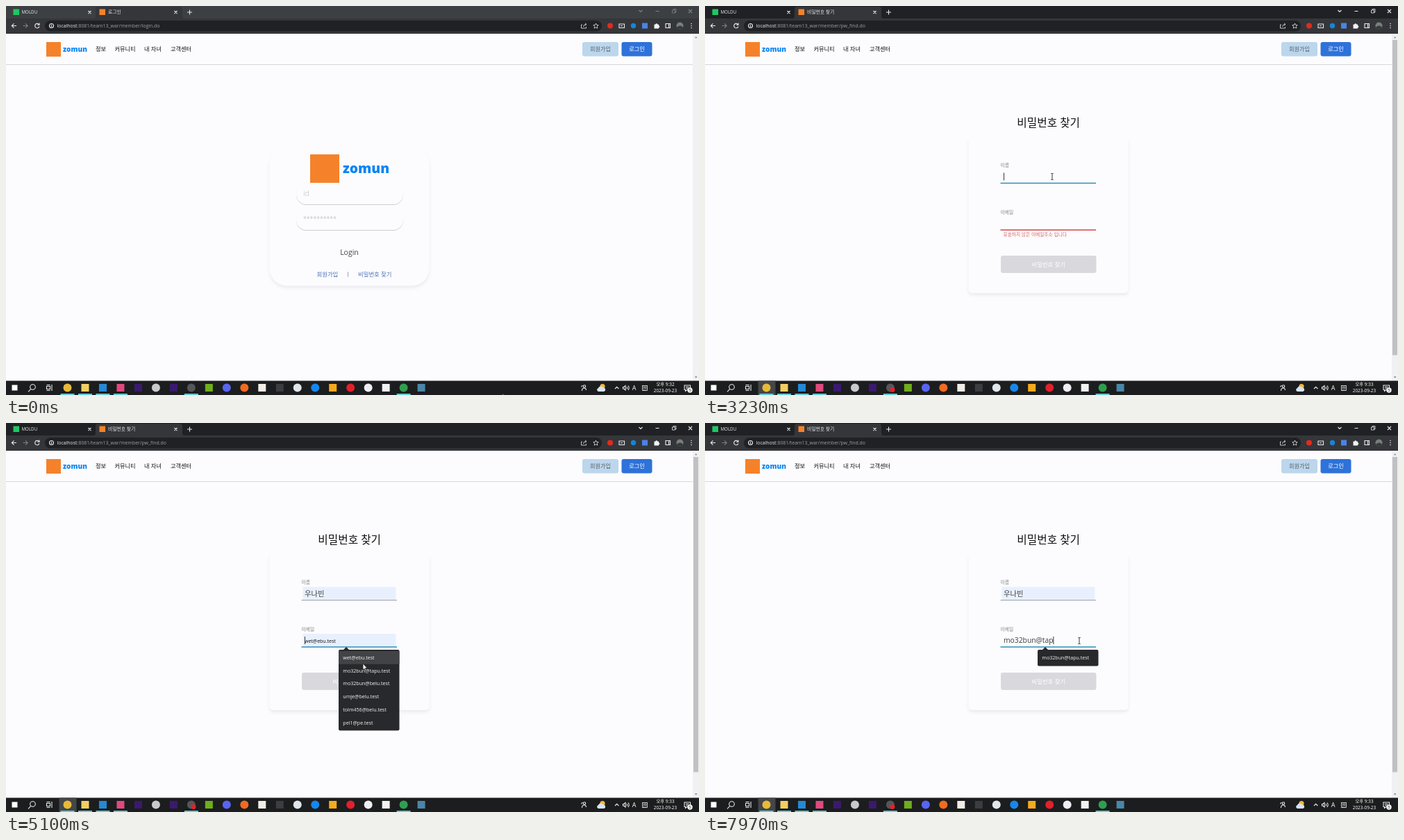
Animation, 998 px wide and 561 px high, one loop 8 s. Source, as an HTML page:

```html
<!DOCTYPE html>
<html lang="ko">
<head>
<meta charset="utf-8">
<title>비밀번호 찾기</title>
<style>
html, body { margin: 0; width: 100%; height: 100%; overflow: hidden; background: #fcfcfe; }
svg { display: block; font-family: "Open Sans", "Noto Sans CJK KR", "Noto Sans CJK", sans-serif; }
text { white-space: pre; }
.mid { text-anchor: middle; }
.tab { font-size: 6.8px; fill: #e8eaed; }
.url { font-size: 6.95px; fill: #9aa0a6; }
.nav { font-size: 8.2px; font-weight: 500; fill: #111; }
.link { font-size: 8.4px; fill: #4a70b4; }
.brand { font-weight: 800; fill: #0a84f5; }
.title { font-size: 15.7px; font-weight: 500; fill: #111; }
.label { font-size: 6.8px; fill: #858585; }
.error { font-size: 6.7px; fill: #d3666b; }
.typed { font-size: 10.3px; fill: #3c3c3c; }
.typed.preview { font-size: 7px; fill: #111; }
.row { font-size: 7.1px; fill: #f4f4f4; }
.clock { font-size: 6.4px; fill: #fff; }
.icon { fill: none; stroke: #e8eaed; stroke-width: 1.1; }
.dim { opacity: .4; }
.card { fill: #fcfcfe; filter: drop-shadow(0 3px 2px rgba(40, 40, 80, .08)); }
.pill { fill: #fcfcfe; filter: drop-shadow(0 1px .4px rgba(0, 0, 0, .18)); }
</style>
</head>
<body>
<svg id="stage" width="998" height="561" viewBox="0 0 998 561">
  <rect width="998" height="561" fill="#fcfcfe"/>

  <!-- browser frame -->
  <rect id="frame" width="998" height="40"/>
  <path d="M0 18H126Q129 18 129 14V5Q129 1 133 1H250Q254 1 254 5V14Q254 18 257 18H998V40H0Z" fill="#35363a"/>
  <rect x="10.500" y="4.500" width="8.500" height="8.500" fill="#1ec862"/>
  <text class="tab" x="22.500" y="11" style="font-size:6.2px">MOLDU</text>
  <path class="icon" d="M118.500 7l4 4m0-4l-4 4M242.500 7l4 4m0-4l-4 4M261 9h7M264.500 5.500v7"/>
  <rect x="134.500" y="4.500" width="8.500" height="8.500" fill="#f5822a" data-show="0 2050"/>
  <g data-show="2050 2600"><circle cx="138.700" cy="8.800" r="2.600" fill="#8b8e93"/><path d="M136.500 10.500l4-3.500" stroke="#35363a" stroke-width=".8"/></g>
  <rect x="134.500" y="4.500" width="8.500" height="8.500" fill="#f5822a" data-show="2600 8000"/>
  <text class="tab" x="147" y="11" data-show="0 2050">로그인</text>
  <text class="tab" x="147" y="11" data-show="2050 8000">비밀번호 찾기</text>
  <g id="controls" class="icon">
    <path d="M911.500 6l2.500 2.500 2.500-2.500M935.500 7.500h5M983 5l5 5m0-5l-5 5"/>
    <path d="M959.500 6h4v4h-4zM961 6V4.500h4V9h-1.500" stroke-width=".8"/>
  </g>
  <rect x="56" y="21" width="802" height="15.500" rx="7.700" fill="#202124"/>
  <path class="icon" d="M15 28.500H8.500m3-3.200l-3.200 3.200 3.200 3.200M47.300 26.500a3.200 3.200 0 1 0 .6 3M48 24.500v2.700h-2.700"/>
  <path class="icon dim" d="M24.500 28.500H31m-3-3.200l3.200 3.200-3.200 3.200"/>
  <circle class="icon" cx="65.500" cy="28.500" r="3" stroke-width=".8"/><path class="icon" d="M65.500 28v2.200m0-3.600v.8" stroke-width=".8"/>
  <text class="url" x="73.500" y="31"><tspan fill="#e8eaed">localhost</tspan>:8081/team13_war/member/<tspan id="page"></tspan></text>
  <g class="icon" stroke-width=".9">
    <path d="M830 27h-1.500v5h7v-2M831.500 30q0-3.500 4-3.500m-1.500-1.700l2 1.700-2 1.700" stroke-width=".8"/>
    <path d="M849.500 25l1.100 2.400 2.600.3-1.900 1.800.5 2.600-2.300-1.300-2.300 1.300.5-2.600-1.900-1.800 2.600-.3z" stroke-width=".8"/>
    <path d="M883 26h7.500v5.500H883zM885 28.800h3"/>
    <path d="M950 25.500h6.500v6H950zM954.500 25.500v6"/>
  </g>
  <circle cx="870" cy="28.500" r="4" fill="#e02b20"/>
  <circle cx="903.500" cy="28.500" r="3.700" fill="#1685d8"/>
  <rect x="916" y="24.500" width="8" height="8" fill="#4b83e6"/>
  <path d="M933.500 26.500h2a1.300 1.300 0 0 1 2.600 0h2v2a1.300 1.300 0 0 1 0 2.600v1.400h-6.600z" fill="#f1f3f4"/>
  <circle cx="970.500" cy="28.500" r="5" fill="#77807a"/><path d="M966 30.500a5 5 0 0 0 9 0q-4-4-9 0z" fill="#343b39"/>
  <path d="M987 25.500h.01M987 28.500h.01M987 31.500h.01" stroke="#e8eaed" stroke-width="1.600" stroke-linecap="round"/>

  <!-- site header -->
  <rect x="58" y="52" width="21" height="21" fill="#f5822a"/>
  <text class="brand" x="82" y="66" font-size="10">zomun</text>
  <text class="nav" x="129" y="65">정보</text>
  <text class="nav" x="156.500" y="65">커뮤니티</text>
  <text class="nav" x="199" y="65">내 자녀</text>
  <text class="nav" x="237" y="65">고객센터</text>
  <rect x="830" y="52" width="52" height="20.500" rx="3" fill="#bcd6ec"/>
  <text class="nav mid" x="856" y="65" style="fill:#55606a;font-weight:400">회원가입</text>
  <rect x="886.500" y="52" width="44" height="20.500" rx="3" fill="#2e72da"/>
  <text class="nav mid" x="908.500" y="65" style="fill:#fff">로그인</text>
  <path d="M0 84.500H989" stroke="#d8d8da"/>
  <rect x="989" y="40" width="9" height="501" fill="#f1f1f3"/>
  <path d="M991.800 46.300l1.900-2.400 1.900 2.400zM991.800 534.300l1.900 2.400 1.900-2.400z" fill="#8c8c8c"/>
  <rect x="990" y="49" width="7" height="454.500" fill="#c1c1c3" data-show="2050 8000"/>

  <!-- login page -->
  <g data-show="0 2050">
    <rect class="card" x="379.500" y="203.500" width="230" height="200" rx="25"/>
    <rect x="438" y="214" width="42" height="41" fill="#f5822a"/>
    <text class="brand" x="485" y="241" font-size="19.300">zomun</text>
    <rect class="pill" x="418" y="257" width="154" height="29" rx="14.500"/>
    <rect class="pill" x="418" y="294" width="154" height="29" rx="14.500"/>
    <text x="428" y="273.500" font-size="10.300" fill="#d0d0c8">id</text>
    <text x="428" y="310" font-size="8.700" fill="#c4c4c6">**********</text>
    <text class="mid" x="494.500" y="359" font-size="10.500" fill="#444">Login</text>
    <text class="link" x="447.500" y="389.500">회원가입</text>
    <path d="M492.500 383.500v7" stroke="#7f8fb0" stroke-width=".8"/>
    <text class="link" x="507" y="389.500">비밀번호 찾기</text>
  </g>

  <!-- password page -->
  <g data-show="2050 8000">
    <text class="title mid" x="494.700" y="174">비밀번호 찾기</text>
    <rect class="card" x="379.500" y="190" width="230" height="224" rx="5"/>
    <text class="label" x="425.500" y="232">이름</text>
    <text class="label" x="425.500" y="299.500">이메일</text>
    <rect id="nameFill" x="427.500" y="236.500" width="134" height="18.500" fill="#e8f0fe"/>
    <rect id="mailFill" x="427.500" y="304" width="134" height="18.500" fill="#e8f0fe"/>
    <path id="nameLine" d="M425.500 255.500H563"/>
    <path id="mailLine" d="M425.500 323H563"/>
    <text class="error" x="429.500" y="263.500" data-show="2050 3200">이름을 입력하세요</text>
    <text class="error" x="429.500" y="331.500" data-show="2050 4700">유효하지 않은 이메일주소 입니다</text>
    <text id="name" class="typed" x="430" y="249.500"></text>
    <text id="mail" class="typed" x="430" y="317"></text>
    <rect id="caret" width=".9" height="11" fill="#222"/>
    <rect x="426" y="360" width="137.500" height="25" rx="3" fill="#d9d9dd"/>
    <text class="mid" x="494.700" y="375.700" font-size="8.400" fill="#fff">비밀번호 찾기</text>
    <g id="popups"></g>
  </g>

  <g data-show="1500 2560">
    <path d="M0 529.500H140Q142 529.500 142 531.500V541H0Z" fill="#292a2d"/>
    <text x="2.500" y="537.300" font-size="6.150" fill="#f1f3f4">localhost:8081/team13_war/member/pw_find.do</text>
  </g>

  <!-- taskbar -->
  <rect y="540.500" width="998" height="20.500" fill="#1c1d1e"/>
  <rect x="76.500" y="540.500" width="25" height="20.500" fill="#444648" data-show="1500 8000"/>
  <g id="apps"></g>
  <rect x="8.500" y="546.500" width="8" height="8" fill="#fff"/>
  <circle class="icon" cx="38.500" cy="549.500" r="3.800"/><path class="icon" d="M35.800 552.300l-3.800 4" stroke-width="1.300"/>
  <path class="icon" d="M58.500 548.500h5v4h-5zM58.500 546.500h5M58.500 554.500h5M66 546v9" stroke-width=".8"/>
  <circle cx="270" cy="553.500" r="3.400" fill="#e8202a" data-show="150 8000"/>
  <g class="icon" stroke-width=".9">
    <circle cx="833" cy="548.500" r="1.700"/><path d="M829.500 555q0-4 3-4t3 3M829 549.500a1.500 1.500 0 0 1 1.500-2"/>
    <path d="M877 552l2.700-2.700 2.700 2.700M888.500 549.500h1.500l2-2v6.500l-2-2h-1.500zM894 549q1.300 1.700 0 3.500M896 547.500q2.300 3 0 6.500"/>
    <rect x="916.500" y="547.500" width="7" height="7" stroke-width=".8"/>
    <path d="M977 547h8.500v6.500h-5l-2 2v-2H977zM979 549.200h4.500M979 551.200h4.500"/>
  </g>
  <circle cx="859" cy="548.500" r="3.600" fill="#f5b83d"/>
  <path d="M853 556a2.600 2.600 0 0 1 0-5 3.800 3.800 0 0 1 7-.5 2.800 2.800 0 0 1 1 5.500z" fill="#d5e4f5"/>
  <text class="mid" x="904.500" y="554" font-size="9" fill="#fff" data-show="0 2050">A</text>
  <g class="icon" data-show="2050 3200"><circle cx="904.500" cy="550.700" r="3"/><path d="M903 549.200l3 3m0-3l-3 3" stroke-width=".9"/></g>
  <text class="mid" x="904.500" y="554" font-size="9" fill="#fff" data-show="3200 8000">A</text>
  <text class="mid" x="920" y="553.500" font-size="6.500" fill="#fff">한</text>
  <text class="clock mid" x="949.500" y="548" id="clock"></text>
  <text class="clock mid" x="949.500" y="557">2023-09-23</text>
  <circle cx="985" cy="554" r="3.700" fill="#f4f4f4"/><text class="mid" x="985" y="556.300" font-size="6" fill="#222">5</text>

  <g id="pointer">
    <path id="arrow" d="M0 0v9l2-1.800 1.400 3 1.400-.7-1.400-2.900H6.200z" fill="#fff" stroke="#222" stroke-width=".8"/>
    <path id="beam" d="M-1.700-4.500H-.5L0-4 .5-4.500H1.700M0-4V4M-1.700 4.500H-.5L0 4 .5 4.500H1.700" fill="none" stroke="#222" stroke-width=".9"/>
  </g>
</svg>
<script>
const LOOP = 8000;
const NAMES = ['이솔', '류다온', '우나빈', '담율', '구름', '솔담중'];
const MAILS = ['wet@ebu.test', 'mo32bun@tapu.test', 'mo32bun@belu.test',
  'umje@belu.test', 'tolm456@belu.test', 'pel1@pe.test'];
const T = { windowFocus: 1500, page: 2050, nameFocus: 3200, namePopup: 3600, namePick: 4290,
  mailFocus: 4700, mailPopup: 4850, mailPick: 5450, erase: 7150, eraseStep: 130 };
const PATH = [[0, 715, 559], [150, 715, 559], [1000, 522, 392], [1230, 522, 392],
  [1600, 529, 386], [2400, 530, 386], [3100, 500, 246], [3650, 500, 246],
  [4200, 504, 308], [4380, 504, 308], [4680, 507, 313], [4850, 508, 314],
  [5100, 514, 347], [5380, 518, 357], [5800, 527, 358], [6600, 539, 314], [8000, 539, 314]];

const $ = id => document.getElementById(id);
const show = (el, on) => { el.style.display = on ? '' : 'none'; };
const make = (parent, tag, attrs, text = '') => {
  const el = document.createElementNS('http://www.w3.org/2000/svg', tag);
  for (const key in attrs) el.setAttribute(key, attrs[key]);
  el.textContent = text;
  return parent.appendChild(el);
};

// Taskbar marks: one flat shape each, evenly spaced.
const APPS = ['c#e9b93a', 's#f3cf62', 's#2489d6', 's#e0497d', 's#3a1a6e', 'c#c9c9cb',
  's#3a1a6e', 'c#55565a', 's#6fae1c', 'c#5865f2', 'c#f26a21', 's#f2ede6', 's#3c3d40',
  'c#dfe6ec', 'c#1687ec', 's#f5aa1c', 'c#e2202c', 'c#f0eef2', 's#f2f2f2', 'c#2f9e4f', 's#4a86a8'];
APPS.forEach((app, i) => {
  const x = 88.5 + i * 25.48, fill = app.slice(1);
  if (app[0] === 'c') make($('apps'), 'circle', { cx: x, cy: 550.5, r: 6, fill });
  else make($('apps'), 'rect', { x: x - 5.5, y: 545, width: 11, height: 11, fill });
  if ([0, 1, 2, 3, 7, 19].includes(i))
    make($('apps'), 'rect', { x: x - 10, y: 559, width: 20, height: 2, fill: '#5fc9cf' });
});

function makePopup(x, y, width, step, items) {
  const group = make($('popups'), 'g', {});
  const height = step * items.length + 4, top = y + 2;
  make(group, 'path', { d: `M485 ${y + 1}l5-5 5 5z`, fill: '#28292c' });
  make(group, 'rect', { x, y, width, height, rx: 2, fill: '#28292c' });
  const hover = make(group, 'rect', { x, width, height: step, fill: '#424346' });
  items.forEach((item, i) =>
    make(group, 'text', { class: 'row', x: x + 6.3, y: top + step * (i + .5) + 2.4 }, item));
  return {
    // Returns the index of the row under the pointer, or -1.
    update(opacity, py) {
      const row = Math.floor((py - top) / step);
      const hit = row >= 0 && row < items.length ? row : -1;
      show(group, opacity > 0);
      group.style.opacity = opacity;
      show(hover, hit >= 0);
      hover.setAttribute('y', top + step * Math.max(hit, 0));
      return hit;
    }
  };
}
const namePopup = makePopup(479.5, 260.5, 80.5, 18.55, NAMES);
const mailPopup = makePopup(479, 327, 87.5, 18.75, MAILS);
const matchPopup = makePopup(479, 327, 87.5, 19.5, [MAILS[1]]);

const timed = [...document.querySelectorAll('[data-show]')]
  .map(el => [el, ...el.dataset.show.split(' ').map(Number)]);

function pointerAt(t) {
  const i = PATH.findIndex(p => p[0] > t);
  const [t0, x0, y0] = PATH[i - 1], [t1, x1, y1] = PATH[i];
  const u = (t - t0) / (t1 - t0), k = u * u * (3 - 2 * u);
  return [x0 + (x1 - x0) * k, y0 + (y1 - y0) * k];
}

function setField(el, text, preview) {
  el.textContent = text;
  el.classList.toggle('preview', preview);
}

function setLine(el, color, width) {
  el.setAttribute('stroke', color);
  el.setAttribute('stroke-width', width);
}

const lineState = (el, t, focus, blur) => t < focus ? setLine(el, '#cf4640', 1.5)
  : t < blur ? setLine(el, '#2b8fb8', 1.5) : setLine(el, '#98a0ae', 1);

const fade = (t, start, end) => t < start ? 0 : Math.max(0, Math.min(1, 1 - (t - end) / 180));

function render(t) {
  for (const [el, from, to] of timed) show(el, t >= from && t < to);
  $('page').textContent = t < T.page ? 'login.do' : 'pw_find.do';
  $('clock').textContent = t < 2900 ? '오후 9:32' : '오후 9:33';
  const focused = t >= T.windowFocus;
  $('frame').setAttribute('fill', focused ? '#202124' : '#3c4043');
  $('controls').style.opacity = focused ? 1 : .4;

  const [x, y] = pointerAt(t);
  const overField = t > T.page && x > 426 && x < 562 && (y > 236 && y < 256 || y > 304 && y < 323)
    && !(t > T.namePopup && t < T.namePick + 180 && y > 260);
  $('pointer').setAttribute('transform', `translate(${x} ${y})`);
  show($('arrow'), !overField);
  show($('beam'), overField);

  const erased = t < T.erase ? 0 : Math.min(6, 1 + Math.floor((t - T.erase) / T.eraseStep));
  const nameRow = namePopup.update(fade(t, T.namePopup, T.namePick), y);
  const mailRow = mailPopup.update(fade(t, T.mailPopup, T.mailPick), y);
  matchPopup.update(erased ? 1 : 0, 0);

  const namePreview = t >= T.namePopup && t < T.namePick && nameRow >= 0;
  const mailPreview = t >= T.mailPopup && t < T.mailPick && mailRow >= 0;
  const name = t >= T.namePick ? NAMES[2] : namePreview ? NAMES[nameRow] : '';
  const mail = t >= T.mailPick ? MAILS[1].slice(0, MAILS[1].length - erased)
    : mailPreview ? MAILS[mailRow] : '';
  setField($('name'), name, namePreview);
  setField($('mail'), mail, mailPreview);
  show($('nameFill'), name);
  show($('mailFill'), mail && !erased);
  lineState($('nameLine'), t, T.nameFocus, T.mailFocus);
  lineState($('mailLine'), t, T.mailFocus, LOOP);

  const inMail = t >= T.mailFocus;
  const preview = inMail ? mailPreview : namePreview;
  const textWidth = preview || t < T.page ? 0 : $(inMail ? 'mail' : 'name').getComputedTextLength();
  const lastEdit = Math.max(...[T.nameFocus, T.namePick, T.mailFocus, T.mailPick,
    erased ? T.erase + (erased - 1) * T.eraseStep : 0].filter(v => v <= t));
  $('caret').setAttribute('x', 430 + textWidth);
  $('caret').setAttribute('y', inMail ? 308 : 240.5);
  show($('caret'), t >= T.nameFocus && (t - lastEdit) % 1060 < 530);
}

const start = performance.now();
function tick() {
  render((performance.now() - start) % LOOP);
  requestAnimationFrame(tick);
}
tick();
</script>
</body>
</html>
```
